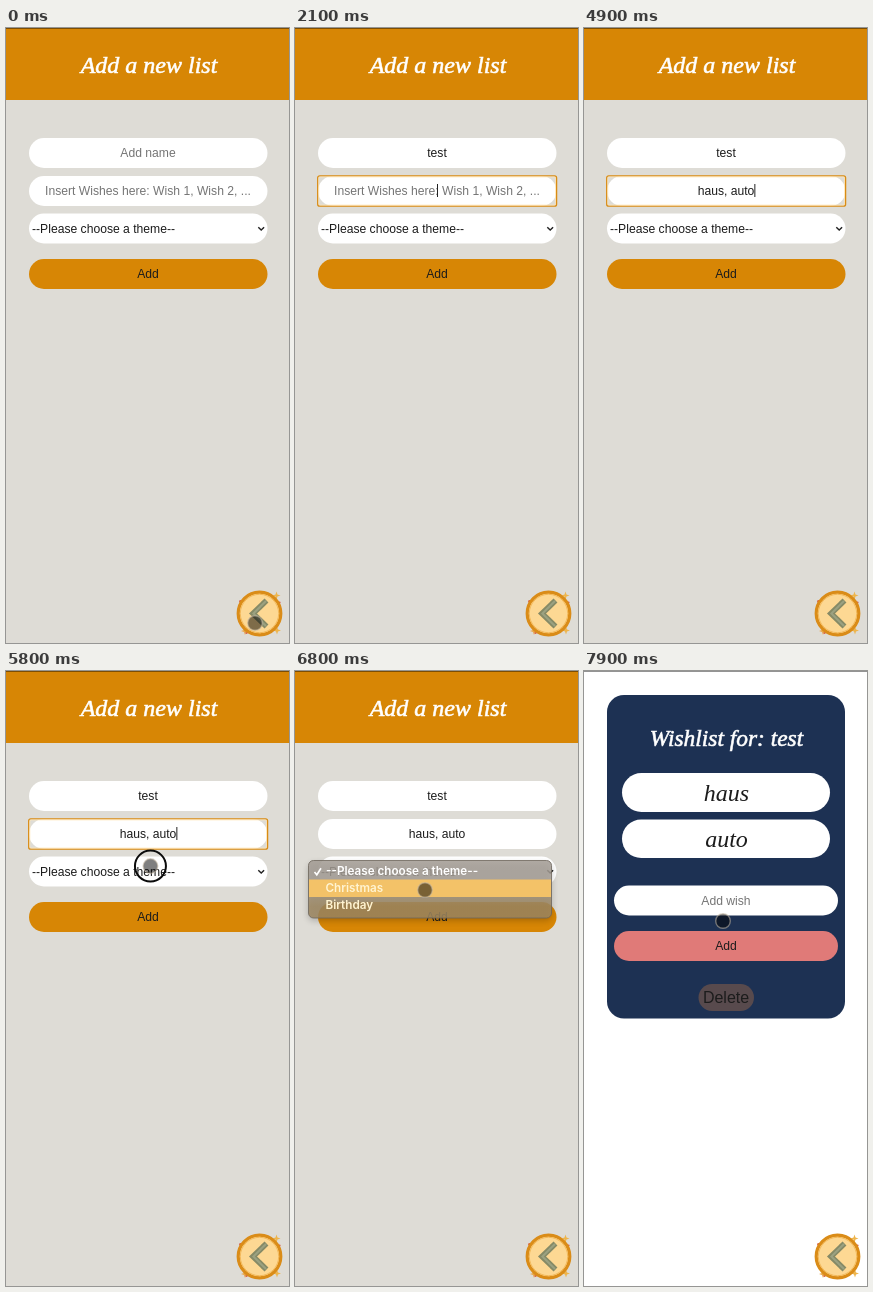
Recreate the animation shown at these times as an HTML page. Size 283x615 px, loop 8 s.

```html
<!DOCTYPE html>
<html lang="en">
<head>
<meta charset="utf-8">
<title>Add a new list</title>
<style>
  html, body { margin: 0; width: 100%; height: 100%; overflow: hidden; background: #dedcd6; }
  svg { display: block; width: 283px; height: 615px; }
  text { font: 12.15px "Liberation Sans", Arial, sans-serif; fill: #1c1c1c; white-space: pre; }
  .mid { text-anchor: middle; }
  .hint { fill: #757575; }
  .script { font: italic 24px "Liberation Serif", "Times New Roman", serif; }
  .title { fill: #fff; stroke: #fff; stroke-width: .6; }
  .menu text { font: 600 11.7px Inter, Roboto, sans-serif; fill: #fff4d2; }
  .hidden { display: none; }
</style>
</head>
<body>
<svg viewBox="0 0 283 615">
  <defs>
    <filter id="soft" x="-10%" y="-30%" width="120%" height="170%"><feGaussianBlur stdDeviation="3"/></filter>
    <linearGradient id="glass" x2="0" y2="1">
      <stop offset=".3" stop-color="#a39c94"/>
      <stop offset=".8" stop-color="#9c8660"/>
    </linearGradient>
    <path id="spark" d="M0-4 1-1 4 0 1 1 0 4-1 1-4 0-1-1Z"/>
  </defs>

  <g id="form">
    <rect width="283" height="615" fill="#dedcd6"/>
    <rect width="283" height="72" fill="#d78605"/>
    <text class="mid script title" x="143" y="44.5">Add a new list</text>
    <g fill="#fff">
      <rect x="23" y="110" width="238.5" height="30" rx="15"/>
      <rect x="23" y="148" width="238.5" height="30" rx="15"/>
      <rect x="23" y="185.5" width="238.5" height="30" rx="15"/>
    </g>
    <rect x="23" y="231" width="238.5" height="30" rx="15" fill="#d78605"/>
    <text id="name" class="mid" x="142" y="129"></text>
    <text id="wishes" class="mid" x="142" y="167"></text>
    <text id="theme" x="26" y="204.5"></text>
    <path d="M252.3 199.2l2.9 2.9 2.9-2.9" fill="none" stroke="#222" stroke-width="1.4"/>
    <text class="mid" x="142" y="250">Add</text>
    <text id="loading" class="mid script" x="142" y="282.5" style="font-size:12px;fill:#3a3a38">Loading...</text>
    <g id="focus" fill="none">
      <rect x="22.7" y="-.2" width="238.9" height="30.4" rx="2" stroke="#d98c14" stroke-width="1.3"/>
      <rect x="23.8" y=".9" width="236.7" height="28.2" rx="1.5" stroke="#ffe3b0" stroke-opacity=".75"/>
    </g>
    <rect id="caret" width="1" height="13" fill="#222"/>

    <g id="menu" class="menu">
      <rect x="13" y="192" width="244" height="58" rx="6" opacity=".2" filter="url(#soft)"/>
      <rect x="13.5" y="189.5" width="243" height="57.5" rx="5" fill="url(#glass)" fill-opacity=".85" stroke="#6d665c" stroke-opacity=".8"/>
      <rect id="hover" x="14" width="242" height="17.5" fill="#f3c268"/>
      <path d="M19.5 201l2.3 2.8 4.2-6.6" fill="none" stroke="#fff" stroke-width="1.6"/>
      <text x="31" y="204" style="fill:#fff">--Please choose a theme--</text>
      <text x="30.5" y="221">Christmas</text>
      <text x="30.5" y="238">Birthday</text>
    </g>
  </g>

  <g id="card">
    <rect width="283" height="615" fill="#fff"/>
    <rect x="23" y="24" width="238" height="323.5" rx="17" fill="#1d3153"/>
    <text class="mid script title" x="142.5" y="75" style="font-size:23.4px">Wishlist for: test</text>
    <g fill="#fff">
      <rect x="38" y="102" width="208" height="39" rx="19.5"/>
      <rect x="38" y="148.5" width="208" height="38.5" rx="19.2"/>
      <rect x="30" y="214.5" width="224" height="30" rx="15"/>
    </g>
    <text class="mid script" x="142.5" y="130">haus</text>
    <text class="mid script" x="142.5" y="176">auto</text>
    <text class="mid hint" x="142" y="233.5">Add wish</text>
    <rect x="30" y="260" width="224" height="30" rx="15" fill="#e07a78"/>
    <text class="mid" x="142" y="278.5">Add</text>
    <rect x="114.5" y="313" width="55.5" height="27" rx="13.5" fill="#584a4d"/>
    <text class="mid" x="142" y="332" style="font-size:16px">Delete</text>
  </g>

  <rect width="283" height="1" fill-opacity=".42"/>

  <g id="back">
    <use href="#spark" x="270.5" y="567.5" fill="#eeb54c"/>
    <use href="#spark" x="239" y="603" fill="#e9a64a"/>
    <use href="#spark" x="271" y="602.5" fill="#eeb54c"/>
    <circle cx="234.5" cy="573.5" r="1.4" fill="#d8604a"/>
    <circle cx="273.5" cy="574.5" r="1.1" fill="#d8604a"/>
    <circle cx="240.5" cy="605" r="1.1" fill="#d8604a"/>
    <circle cx="253.5" cy="585.5" r="21.3" fill="#fdd893" stroke="#da8c18" stroke-width="3.2"/>
    <circle cx="253.5" cy="585.5" r="19.2" fill="none" stroke="#f3b95a"/>
    <g fill="none">
      <path d="M260.5 572.5L247 585.5 260.5 598.5" stroke="#868a66" stroke-width="5.6"/>
      <path d="M260 573L247.4 585.5 260 598" stroke="#9ba181" stroke-width="2"/>
    </g>
  </g>

  <g id="pointer">
    <circle r="7.3" fill="#000" fill-opacity=".5" stroke="#c4b8a4" stroke-opacity=".55" stroke-width="1.4"/>
    <circle id="ring" r="15.5" fill="none" stroke="#0b0b0b" stroke-width="2"/>
  </g>
</svg>

<script>
const $ = id => document.getElementById(id);
const LOOP = 8000, STEP = 100;
const PROMPT = "--Please choose a theme--";

// Pointer stops: time, x, y
const PATH = [
  [0, 249, 595], [100, 248, 590], [600, 142, 126], [1600, 142, 126], [1800, 143, 160],
  [5400, 143, 163], [5700, 144.5, 195], [6200, 144, 196], [6700, 130, 219],
  [7000, 130, 219], [7500, 138, 249], [7800, 138.5, 249], [7900, 139, 250]
];
const SHOWN = [[0, 900], [1600, 2000], [5400, LOOP]];
const CLICKS = [[600, 800], [1800, 2000], [5700, 5900], [6900, 7100], [7500, 7700]];

const NAME = { text: "test", keys: [1000, 1150, 1300, 1450], hint: "Add name", from: 700, to: 1900, y: 110 };
const WISHES = {
  text: "haus, auto", keys: [2700, 2850, 3000, 3150, 3350, 4100, 4250, 4400, 4600, 4750],
  hint: "Insert Wishes here: Wish 1, Wish 2, ...", from: 1900, to: 5900, y: 148
};

const within = (t, spans) => spans.some(([a, b]) => t >= a && t < b);
const show = (id, on) => $(id).classList.toggle("hidden", !on);

function pointerAt(t) {
  const i = PATH.findIndex(p => p[0] > t);
  if (i < 0) return PATH[PATH.length - 1].slice(1);
  const [t0, x0, y0] = PATH[i - 1], [t1, x1, y1] = PATH[i];
  const u = (t - t0) / (t1 - t0), e = u * u * (3 - 2 * u);
  return [x0 + (x1 - x0) * e, y0 + (y1 - y0) * e];
}

function drawField(id, field, t) {
  const el = $(id), count = field.keys.filter(k => k <= t).length;
  el.textContent = count ? field.text.slice(0, count) : field.hint;
  el.classList.toggle("hint", !count);
  if (t < field.from || t >= field.to) return false;
  const last = count ? field.keys[count - 1] : field.from;
  const x = 142 + (count ? el.getComputedTextLength() / 2 : 0);
  $("caret").setAttribute("x", x);
  $("caret").setAttribute("y", field.y + 8);
  show("caret", (t - last) % 1000 < 500);
  $("focus").setAttribute("transform", `translate(0 ${field.y})`);
  return true;
}

function draw(t) {
  const done = t >= 7900;
  show("form", !done);
  show("card", done);

  const inName = drawField("name", NAME, t);
  const inWishes = drawField("wishes", WISHES, t);
  const onButton = t >= 7600;
  if (onButton) $("focus").setAttribute("transform", "translate(0 231)");
  show("focus", inName || inWishes || onButton);
  if (!inName && !inWishes) show("caret", false);

  $("theme").textContent = t < 7100 ? PROMPT : "Christmas";
  show("loading", t >= 7700);

  const [x, y] = pointerAt(t);
  show("menu", t >= 5900 && t < 7100);
  $("hover").setAttribute("y", y < 208 ? 190.5 : 208.5);
  $("pointer").setAttribute("transform", `translate(${x} ${y})`);
  show("pointer", within(t, SHOWN));
  show("ring", within(t, CLICKS));
}

const start = performance.now();
function tick() {
  const t = (performance.now() - start) % LOOP;
  draw(Math.floor(t / STEP) * STEP);
  requestAnimationFrame(tick);
}
draw(0);
requestAnimationFrame(tick);
</script>
</body>
</html>
```
